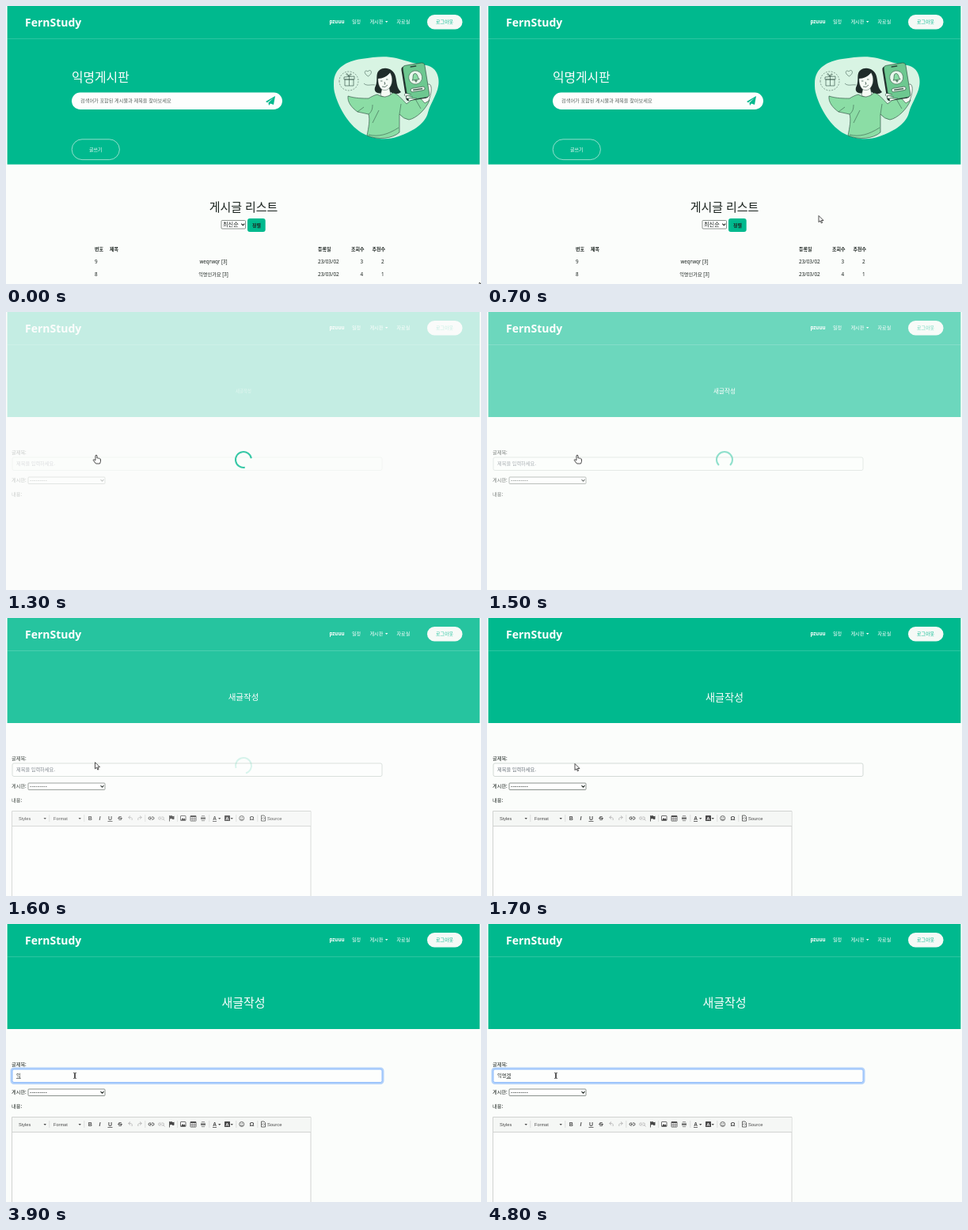
Animation of 600x352 px, one loop 5 s. Source, as an HTML page with a canvas:

```html
<!DOCTYPE html>
<html lang="ko">
<meta charset="utf-8">
<title>Board</title>
<style>
html, body { margin: 0; width: 100%; height: 100%; overflow: hidden; background: #fbfdfb; }
canvas { display: block; }
</style>
<canvas id="stage" width="600" height="352"></canvas>
<script>
const ctx = document.getElementById('stage').getContext('2d');
const GREEN = '#00b98e', PAPER = '#fbfdfb', INK = '#1c2420', PALE = '#f5f9f6';
const SANS = '"Noto Sans", "Noto Sans CJK KR", "Noto Sans CJK", sans-serif';
const UI = '"Liberation Sans", sans-serif';

function text(str, x, y, size, color = INK, { weight = 400, align = 'left', family = SANS } = {}) {
  ctx.font = `${weight} ${size}px ${family}`;
  ctx.textAlign = align;
  ctx.fillStyle = color;
  ctx.fillText(str, x, y);
}

function path(d, fill, stroke, width = 1) {
  const p = new Path2D(d);
  if (fill) { ctx.fillStyle = fill; ctx.fill(p); }
  if (stroke) { ctx.strokeStyle = stroke; ctx.lineWidth = width; ctx.stroke(p); }
}

function box(x, y, w, h, r, fill, stroke, width = 1) {
  ctx.beginPath();
  ctx.roundRect(x, y, w, h, r);
  if (fill) { ctx.fillStyle = fill; ctx.fill(); }
  if (stroke) { ctx.strokeStyle = stroke; ctx.lineWidth = width; ctx.stroke(); }
}

function at(x, y, draw, scale = 1, angle = 0) {
  ctx.save();
  ctx.translate(x, y);
  ctx.rotate(angle);
  ctx.scale(scale, scale);
  draw();
  ctx.restore();
}

// Linear interpolation through rows of [time, ...values]
function tween(t, rows) {
  if (t <= rows[0][0]) return rows[0].slice(1);
  const i = rows.findIndex(row => row[0] > t);
  if (i < 0) return rows.at(-1).slice(1);
  const a = rows[i - 1], b = rows[i], k = (t - a[0]) / (b[0] - a[0]);
  return a.slice(1).map((v, j) => v + (b[j + 1] - v) * k);
}

const caret = (x, y, color) => path(`M${x} ${y}h3.4l-1.7 1.9z`, color);
const chevron = (x, y) => path(`M${x} ${y}l2 2 2-2`, null, INK, 1.1);

function header(height) {
  ctx.fillStyle = PAPER;
  ctx.fillRect(0, 0, 600, 352);
  ctx.fillStyle = GREEN;
  ctx.fillRect(1.6, 0, 596.8, height);
  ctx.fillStyle = 'rgba(255,255,255,.17)';
  ctx.fillRect(1.6, 41, 596.8, 1);
  text('FernStudy', 24, 26, 14, '#fff', { weight: 600 });
  text('pzuuu', 408.5, 22.3, 6.2, '#fff', { weight: 700 });
  const nav = { weight: 500 };
  text('일정', 437, 22.3, 6.1, '#fff', nav);
  text('게시판', 459.5, 22.3, 6.1, '#fff', nav);
  caret(479, 19, '#fff');
  text('자료실', 493.5, 22.3, 6.1, '#fff', nav);
  box(532, 11, 44.5, 18.5, 9.25, PALE);
  text('로그아웃', 554, 22.3, 6, GREEN, { weight: 500, align: 'center' });
}

function illustration() {
  const LINE = '#27453a', LEAF = '#8bdda5', SKIN = '#f6fbf5';
  path('M414 98C414 78 430 70 449 67C467 64 480 63 493 66C508 70 519 74 531 75C546 78 549 94 545 106C541 118 536 124 533 135C529 151 510 160 496 165C480 171 463 168 452 162C434 153 421 130 416 113C414 107 414 103 414 98z', '#d8f4e3');
  // Gift and heart
  ctx.setLineDash([2, 1.5]);
  path('M421 95a12 12 0 1 0 24 0a12 12 0 1 0 -24 0', null, LINE, .5);
  ctx.setLineDash([]);
  path('M428 93h11v8h-11zM427 90l13-1v4h-13zM433.5 90v11M433 89c-6-3-2-6 0 0c2-6 6-2 0 0', null, LINE, .6);
  path('M457.500 89c-7-4-4-9-.500-6c3-4 8 1 .500 6M452 98c4 4 9 1 14 2', null, LINE, .5);
  // Hair behind, neck and body
  path('M467 101C470 94 466 85 472 81C479 76 490 80 492 89C494 97 493 103 499 109C495 112 490 112 486 109L475 110C469 112 463 108 467 101z', '#1f2c2a');
  path('M475 104l9-1 2 9-6 5-7-4z', SKIN, LINE, .5);
  path('M469 112Q479 119 489 110C495 111 500 118 506 124L521 112 535 119C531 130 519 142 509 144Q502 143 497 137L497 160C488 168 470 170 456 164C458 154 460 144 458 137L444 134C437 129 431 122 432 114C441 117 451 117 458 117C461 115 465 113 469 112z', LEAF, LINE, .6);
  path('M458 137C462 134 463 130 463 125M458 163C470 166 482 163 496 154M497 137l2-13M516 116l8 14M471 132l-8 16M444 134l8-6', null, LINE, .5);
  // Face
  path('M470 91C478 91 483 87 485 84C489 90 489 100 483 105C476 110 469 103 470 91z', SKIN, LINE, .4);
  path('M469 92C468 83 477 80 486 83C482 89 476 92 469 92z', '#1f2c2a');
  path('M473 95h2.500M480 93h2.500M478 96l1 3-1.500 0M475 102q4 2 7-2', null, LINE, .7);
  // Hand and phone
  path('M520 113C526 109 530 98 535 99C539 102 537 111 534 120L529 123z', SKIN, LINE, .6);
  at(517.500, 95.500, () => {
    box(-15.500, -21, 29, 44, 4, '#1f2c2a');
    box(-13.500, -22, 28, 44, 4, '#6dc890', LINE, .6);
    box(-4, -20, 8, 1.6, .8, LINE);
    path('M-8 -5a8.500 8.500 0 1 0 17 0a8.500 8.500 0 1 0 -17 0', '#e8f8ec', LINE, .5);
    path('M-4 -2C-2 -4 -3 -10 .500 -10C4 -10 3 -4 5 -2zM-1 -1h3l-1.500 2z', LEAF, LINE, .6);
    box(-8, 8, 18, 4.5, 2, '#e8f8ec', LINE, .6);
    path('M-5 10.300h12', null, LINE, 1.2);
  }, 1, -.16);
  path('M504 114c-2-3 1-4 3-3l5 1M506 117c-2-3 1-4 3-3l5 1M509 120c-2-3 1-4 4-3l6 0', SKIN, LINE, .6);
}

function listPage(hover) {
  header(200.6);
  text('익명게시판', 83, 96, 15.8, '#fff', { weight: 500 });
  box(83, 109.5, 266, 21.5, 10.75, '#fdfefd');
  text('검색어가 포함된 게시물과 제목을 찾아보세요', 94, 122.3, 6.2, '#59635f');
  path('M328 121l12-7-2 11-4-1.600-2 2.600-.500-3.500 6-6-7.500 5.700z', GREEN);
  box(83.2, 168.8, 60.2, 25.8, 12.9, `rgba(245,249,246,${hover})`, 'rgba(245,249,246,.85)', .7);
  text('글쓰기', 113.3, 183.8, 6, hover > .5 ? INK : '#fff', { weight: 500, align: 'center' });
  illustration();

  text('게시글 리스트', 300, 260.3, 15, INK, { weight: 500, align: 'center' });
  box(272, 271.5, 30.5, 10.5, 1, '#fff', '#6f7672', .8);
  text('최신순', 274, 279.3, 7.2);
  chevron(297.3, 275.7);
  box(305, 269, 22.7, 17, 3, GREEN);
  text('정렬', 316.5, 279.8, 6, INK, { weight: 600, align: 'center' });

  const columns = [['번호', 112], ['제목', 131], ['등록일', 394], ['조회수', 436], ['추천수', 462.5]];
  for (const [label, x] of columns) text(label, x, 309.7, 6, INK, { weight: 700 });
  const rows = [['9', 'weqrwqr [3]', '3', '2'], ['8', '익명인가요 [3]', '4', '1']];
  rows.forEach(([id, title, views, votes], i) => {
    const y = 326 + i * 16;
    text(id, 112, y, 6.3);
    text(title, 262, y, 6.2, INK, { align: 'center' });
    text('23/03/02', 394, y, 6.4);
    text(views, 451, y, 6.3, INK, { align: 'right' });
    text(votes, 477.5, y, 6.3, INK, { align: 'right' });
  });
}

function editor() {
  const DARK = '#484848', SOFT = '#bdbdbd';
  box(7.5, 244.5, 377.5, 120, 0, '#fdfefd', '#d1d3d1');
  ctx.fillStyle = '#f5f7f5';
  ctx.fillRect(8, 245, 376.5, 18);
  ctx.fillStyle = '#d1d3d1';
  ctx.fillRect(8, 263, 377, 1);
  for (const x of [54.5, 98.5, 175.5, 216, 256.5, 290.5, 317.5]) ctx.fillRect(x, 249, .7, 9);

  const label = (s, x, style = '', size = 7) =>
    text(s, x, 256, size, DARK, { weight: style, family: UI, align: 'center' });
  text('Styles', 16, 255.5, 5.6, DARK, { family: UI });
  text('Format', 60, 255.5, 5.6, DARK, { family: UI });
  text('Source', 330, 255.5, 5.8, DARK, { family: UI });
  for (const x of [47.5, 91.5, 268, 283.5]) caret(x, 253, DARK);
  label('B', 106.3, 'bold');
  label('I', 118.5, 'italic bold');
  label('U', 131.5, 'bold');
  label('S', 144, 'bold');
  label('A', 263.5, 'bold', 6.5);
  label('Ω', 310.5, 'bold', 7.5);
  path('M128.500 257.500h6M141 253.500h6M261 257.500h5', null, DARK, .8);

  path('M159 256c1-3-1-4-4-3.500m2-2l-2.500 2 2.500 2', null, SOFT, 1);
  path('M167 256c-1-3 1-4 4-3.500m-2-2l2.500 2-2.500 2', null, SOFT, 1);
  const link = 'h-1.500a1.500 1.500 0 0 0 0 3h1.500m1 -3h1.500a1.500 1.500 0 0 1 0 3h-1.500m-2 -1.500h2';
  path('M183 252' + link, null, DARK, 1);
  path('M195.500 252' + link + 'm2 1l2 2', null, SOFT, 1);
  path('M206.500 250v7.500', null, DARK, .9);
  path('M207 250.500q2-1 3 0t2.500 0v4q-1.500 1-2.500 0t-3 0z', DARK);
  box(220.5, 250.5, 6.5, 6, .5, '#fff', DARK, .8);
  path('M221 256l2-3 1.500 1.500 1-1 1.500 2.500z', DARK);
  box(233, 250.5, 7, 6.5, .3, '#fff', DARK, .8);
  path('M233 251.200h7', null, DARK, 1.6);
  path('M233 254.300h7M235.300 252v5M237.700 252v5', null, DARK, .6);
  path('M247 250.500h4M247 256.700h4M246 252.200h6M246 255h6', null, '#777', .7);
  path('M246 253.600h6', null, DARK, 1.2);
  box(276, 250, 7, 7, .5, DARK);
  text('A', 279.5, 255.9, 6, '#fff', { weight: 700, family: UI, align: 'center' });
  path('M294.700 253.500a3 3 0 1 0 6 0a3 3 0 1 0 -6 0M296.200 254.500q1.500 1.500 3 0M296.500 252.500h.800M298.200 252.500h.800', null, DARK, .8);
  path('M322.500 250h3.500l1.500 1.500v5.500h-5zM324.500 252.500l-1 1 1 1M325.700 252.500l1 1-1 1', null, DARK, .8);
}

// Hangul composed one keystroke at a time
function typedText(t) {
  const strokes = [[4800, '익명겟'], [4500, '익명게'], [4300, '익명ㄱ'], [4100, '익며'],
    [4000, '익ㅁ'], [3900, '익'], [3500, '이'], [3300, 'ㅇ']];
  return strokes.find(([start]) => t >= start)?.[1] ?? '';
}

function writePage(t) {
  header(133);
  const [scale, opacity] = tween(t, [[1300, .36, .5], [1400, .4, .7], [1500, .51, 1],
    [1600, .7, 1], [1700, .87, 1], [1800, .95, 1], [2000, 1, 1]]);
  ctx.globalAlpha = opacity;
  at(300, 100, () => text('새글작성', 0, 5.2, 15, '#fff', { weight: 500, align: 'center' }), scale);
  ctx.globalAlpha = 1;

  text('글제목:', 7, 180.3, 6.2);
  const [focus] = tween(t, [[2600, 0], [2700, .6], [2800, 1]]);
  if (focus) box(7, 183, 469, 18.5, 3, null, `rgba(120,175,250,${.55 * focus})`, 3);
  box(8, 184, 467, 16.5, 2, '#fdfefd', focus ? '#86b7fe' : '#ced6d2', .9);
  const typed = typedText(t);
  text(typed || '제목을 입력하세요.', 13, 194.3, 6.2, typed ? INK : '#6c757d');
  if (typed) {
    const end = ctx.measureText(typed).width, start = ctx.measureText(typed.slice(0, -1)).width;
    ctx.fillRect(13 + start, 195.3, end - start, .6);
  }

  text('게시판:', 7, 215.3, 6.2);
  box(28, 209, 97, 8.5, 1, '#fff', '#6f7672', .8);
  text('---------', 30, 215, 7.3, INK, { family: UI });
  chevron(119.5, 212.2);
  text('내용:', 7, 233.3, 6.2);
  if (t >= 1600) editor();
}

function preloader(t) {
  const [cover] = tween(t, [[1300, .78], [1400, .78], [1500, .43], [1600, .15], [1700, 0]]);
  if (!cover) return;
  ctx.globalAlpha = cover;
  ctx.fillStyle = PAPER;
  ctx.fillRect(0, 0, 600, 352);
  const gap = (35 + (t - 1300) * .275) * Math.PI / 180;
  ctx.beginPath();
  ctx.arc(300, 187, 10, gap + Math.PI / 4, gap - Math.PI / 4);
  ctx.strokeStyle = GREEN;
  ctx.lineWidth = 2;
  ctx.stroke();
  ctx.globalAlpha = 1;
}

function pointer(t) {
  const [x, y] = tween(t, [[0, 598, 350], [300, 566, 343], [600, 488, 331], [800, 350, 200],
    [1000, 200, 142], [1100, 132, 165], [1200, 114, 181], [1500, 114, 181], [1700, 111, 184.5],
    [2100, 111, 184.5], [2600, 87, 192]]);
  at(x, y, () => {
    if (t >= 2200) path('M-1.700 -3.500q1.700 0 1.700 1v5q0 1-1.700 1M1.700 -3.500q-1.700 0-1.700 1v5q0 1 1.700 1', null, '#111', .9);
    else if (t >= 1100 && t < 1600) path('M-1 .800q1-1.600 2 0v3.200q1-.700 1.700.300q1-.500 1.600.500q1.200-.300 1.200 1v2.500l-1 2.700h-5l-3.500-4.500q.300-1.700 3 .300z', '#fff', '#222', .8);
    else path('M0 0v8.200l2-1.800 1.300 3 1.300-.600-1.300-2.800h2.700z', '#fff', '#222', .8);
  });
}

function frame(now) {
  const t = Math.floor(now % 5000 / 100) * 100; // ten pictures per second
  if (t < 1300) listPage(tween(t, [[900, 0], [1200, 1]])[0]);
  else { writePage(t); preloader(t); }
  pointer(t);
  requestAnimationFrame(frame);
}
requestAnimationFrame(frame);
</script>
</html>
```
